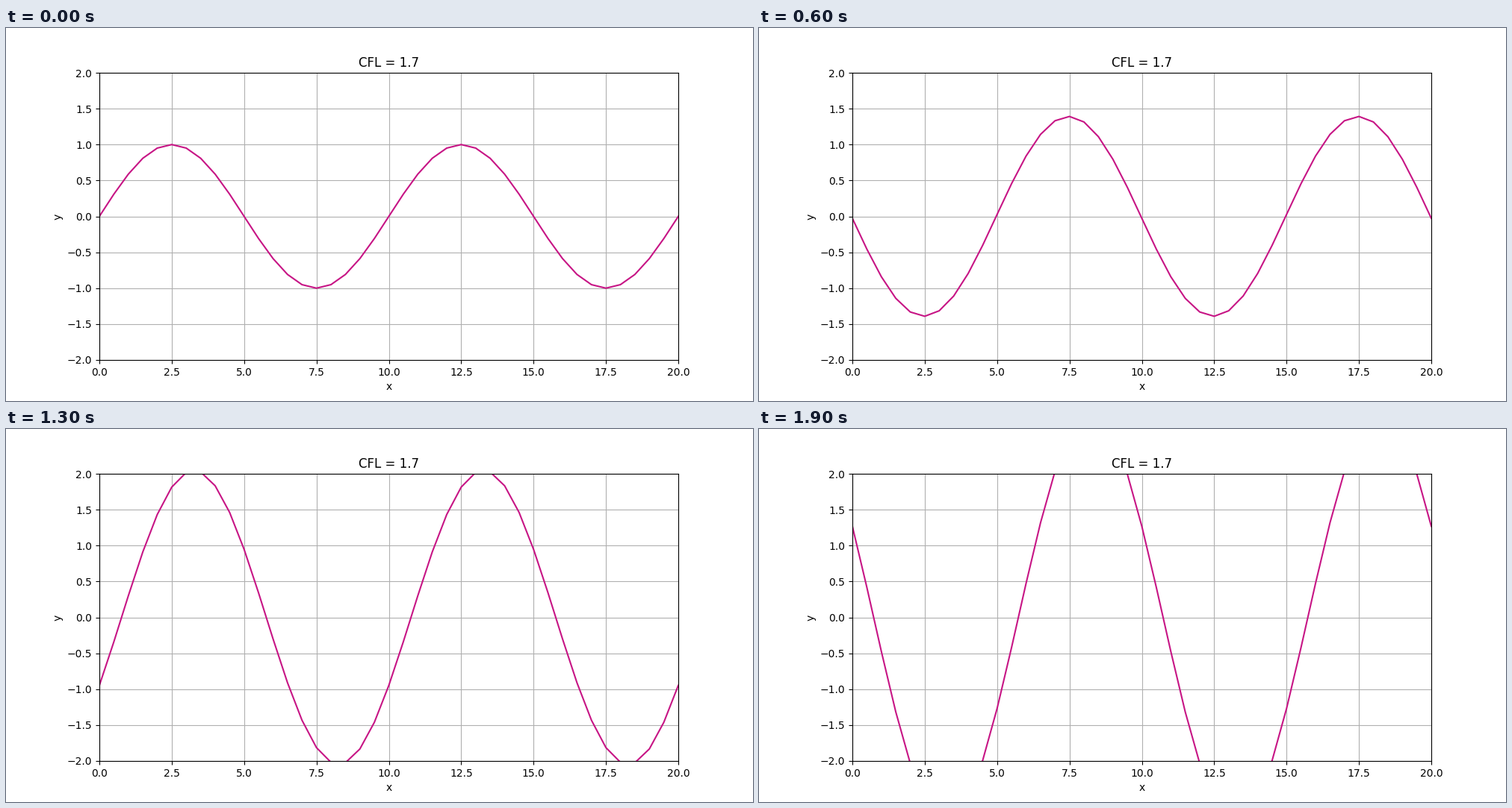
Recreate the animation shown at these times as a matplotlib script. Size 1000 px wide and 500 px high, loop 2000 ms.

```python
import matplotlib.pyplot as plt
import numpy as np
from matplotlib.animation import FuncAnimation

CFL = 1.7
STEPS = 20
LENGTH = 20.0
CELLS = 40

x = np.linspace(0, LENGTH, CELLS + 1)


def upwind(u):
    """Advance one explicit upwind step on a periodic domain."""
    inner = u[:-1]
    new = inner - CFL * (inner - np.roll(inner, 1))
    return np.append(new, new[0])


waves = [np.sin(2 * np.pi * x / 10)]
for _ in range(STEPS - 1):
    waves.append(upwind(waves[-1]))

fig, ax = plt.subplots(figsize=(10, 5), dpi=100)
line, = ax.plot(x, waves[0], color="mediumvioletred", lw=1.5)
ax.set(xlim=(0, LENGTH), ylim=(-2, 2), xlabel="x", ylabel="y",
       title=f"CFL = {CFL}")
ax.grid(True)


def update(step):
    line.set_ydata(waves[step])
    return line,


anim = FuncAnimation(fig, update, frames=STEPS, interval=100,
                     repeat=True, repeat_delay=0)
plt.show()
```
